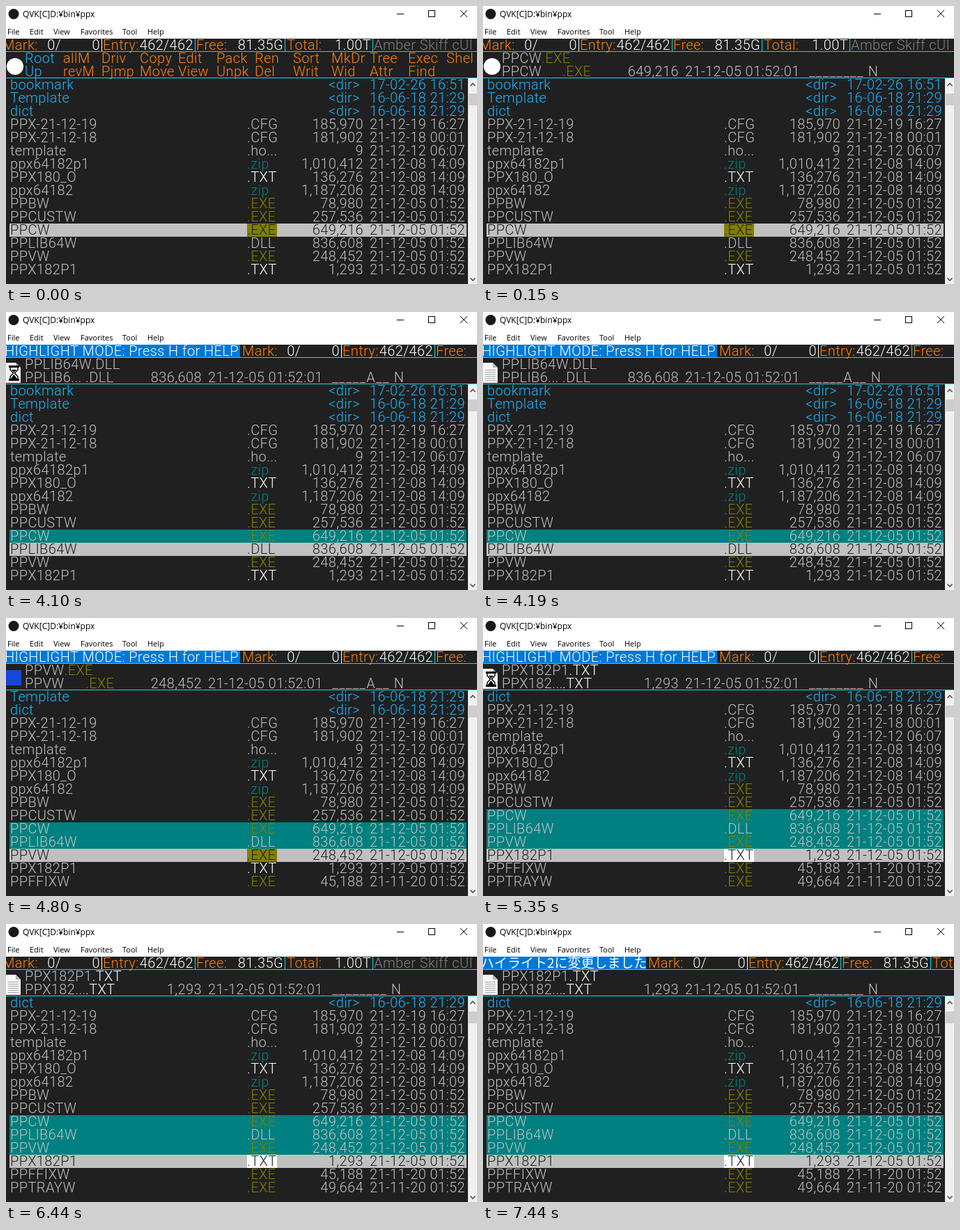
An HTML page with a canvas for the animation above (8 s loop, 676x400 px).

```html
<!DOCTYPE html>
<html lang="en">
<head>
<meta charset="utf-8">
<style>
html, body { margin: 0; width: 676px; height: 400px; overflow: hidden; background: #202020; }
canvas { display: block; }
</style>
</head>
<body>
<canvas id="stage" width="676" height="400"></canvas>
<script>
const ctx = document.getElementById('stage').getContext('2d');
const LOOP = 8000, ROW = 19, TOP = 104;
const BG = '#202020', GREY = '#c0c0c0', WHITE = '#ffffff', TEAL = '#008080', OLIVE = '#808000',
      ORANGE = '#ff8010', SKY = '#1eb4ff', BLUE = '#0078d7', CYAN = '#00e0f0', DIM = '#808080';
const LIST = "350 20px Roboto, 'Noto Sans', sans-serif";
const JP = "19px 'Noto Sans CJK JP', 'Noto Sans CJK', sans-serif";
const UI = "11px 'Open Sans', 'Noto Sans', sans-serif";
const TITLE = "12px 'Open Sans', 'Noto Sans', sans-serif";
const EXT = { '.EXE': OLIVE, '.zip': TEAL, '.TXT': WHITE };

// name, extension, size, date, time
const files = [
  ['bookmark', '', '<dir>', '17-02-26', '16:51'],
  ['Template', '', '<dir>', '16-06-18', '21:29'],
  ['dict', '', '<dir>', '16-06-18', '21:29'],
  ['PPX-21-12-19', '.CFG', '185,970', '21-12-19', '16:27'],
  ['PPX-21-12-18', '.CFG', '181,902', '21-12-18', '00:01'],
  ['template', '.ho...', '9', '21-12-12', '06:07'],
  ['ppx64182p1', '.zip', '1,010,412', '21-12-08', '14:09'],
  ['PPX180_O', '.TXT', '136,276', '21-12-08', '14:09'],
  ['ppx64182', '.zip', '1,187,206', '21-12-08', '14:09'],
  ['PPBW', '.EXE', '78,980', '21-12-05', '01:52'],
  ['PPCUSTW', '.EXE', '257,536', '21-12-05', '01:52'],
  ['PPCW', '.EXE', '649,216', '21-12-05', '01:52'],
  ['PPLIB64W', '.DLL', '836,608', '21-12-05', '01:52'],
  ['PPVW', '.EXE', '248,452', '21-12-05', '01:52'],
  ['PPX182P1', '.TXT', '1,293', '21-12-05', '01:52'],
  ['PPFFIXW', '.EXE', '45,188', '21-11-20', '01:52'],
  ['PPTRAYW', '.EXE', '49,664', '21-11-20', '01:52']
];

const commands = ['Root Up', 'allM revM', 'Driv Pjmp', 'Copy Move', 'Edit View', 'Pack Unpk',
  'Ren Del', 'Sort Writ', 'MkDr Wid', 'Tree Attr', 'Exec Find', 'Shel'];

const steps = [
  { at: 0, cursor: 11, scroll: 0, icon: 'app', menu: true },
  { at: 150, menu: false },
  { at: 1550, mode: 'help' },
  { at: 4100, cursor: 12, icon: 'wait' },
  { at: 4190, icon: 'page' },
  { at: 4800, cursor: 13, scroll: 1, icon: 'viewer' },
  { at: 5350, cursor: 14, scroll: 2, icon: 'wait' },
  { at: 5430, icon: 'page' },
  { at: 6440, mode: '' },
  { at: 7440, mode: 'done' }
];

function box(x, y, w, h, color) {
  ctx.fillStyle = color;
  ctx.fillRect(x, y, w, h);
}

function text(s, x, y, color, align = 'left', font = LIST, gap = 0.4) {
  ctx.font = font;
  ctx.letterSpacing = gap + 'px';
  ctx.textAlign = align;
  ctx.fillStyle = color;
  ctx.fillText(s, x, y);
}

function shape(points, color) {
  ctx.fillStyle = color;
  ctx.beginPath();
  points.forEach(([x, y]) => ctx.lineTo(x, y));
  ctx.fill();
}

function stroke(points, color, width = 1) {
  ctx.strokeStyle = color;
  ctx.lineWidth = width;
  ctx.beginPath();
  points.forEach(([x, y], i) => i ? ctx.lineTo(x, y) : ctx.moveTo(x, y));
  ctx.stroke();
}

function disc(x, y, r, color) {
  ctx.fillStyle = color;
  ctx.beginPath();
  ctx.arc(x, y, r, 0, 7);
  ctx.fill();
}

function drawWindow() {
  box(0, 0, 676, 47, WHITE);
  disc(11, 11.5, 7.5, '#181818');
  text('QVK[C]D:¥bin¥ppx', 24, 16, '#000', 'left', TITLE, 0);
  stroke([[561, 11.5], [571, 11.5]], '#000');
  ctx.strokeRect(606.5, 6.5, 9, 9);
  stroke([[652, 6], [662, 16]], '#000');
  stroke([[662, 6], [652, 16]], '#000');
  [['File', 2], ['Edit', 34], ['View', 68], ['Favorites', 107], ['Tool', 167], ['Help', 203]]
    .forEach(([s, x]) => text(s, x, 41, '#000', 'left', UI, 0));
}

function drawScrollbar() {
  box(663, TOP, 13, 296, '#f0f0f0');
  box(664, 126, 12, 17, '#cdcdcd');
  stroke([[666.5, 115], [670, 111.5], [673.5, 115]], '#505050', 1.6);
  stroke([[666.5, 391.5], [670, 395], [673.5, 391.5]], '#505050', 1.6);
}

function drawStatus(mode) {
  let dx = 0;
  const y = 63;
  if (mode === 'help') {
    dx = 344;
    box(0, 47, 336, 18, BLUE);
    text('HIGHLIGHT MODE: Press H for HELP', -2, y, WHITE);
  } else if (mode === 'done') {
    dx = 242;
    box(0, 47, 234, 18, BLUE);
    text('ハイライト2に変更しました', -3, y, WHITE, 'left', JP, 0);
  }
  [['Mark:', -5], ['Entry:', 139], ['Free:', 273], ['Total:', 403]]
    .forEach(([s, x]) => text(s, x + dx, y, ORANGE));
  [['0/', 79], ['0', 135], ['462/462', 269], ['81.35G', 398], ['1.00T', 524]]
    .forEach(([s, x]) => text(s, x + dx, y, WHITE, 'right'));
  [137, 271, 400, 526].forEach((x, i) => box(x + dx, 47, 1, 18, i ? CYAN : WHITE));
  text('Amber Skiff cUI', 528 + dx, y, DIM);
}

function drawPage() {
  shape([[0, 73], [14, 73], [21, 80], [21, 102], [0, 102]], '#f6f6f6');
  shape([[14, 73], [14, 80], [21, 80]], '#b8b8b8');
}

function drawIcon(kind) {
  if (kind === 'app') disc(13, 87, 12, WHITE);
  if (kind === 'viewer') box(0, 75, 22, 22, '#1846d8');
  if (kind === 'page') {
    drawPage();
    for (let y = 83; y < 100; y += 3) box(3, y, 15, 1, '#a8a8a8');
  }
  if (kind === 'wait') {
    drawPage();
    box(4, 77, 15, 3, '#000');
    box(4, 96, 15, 3, '#000');
    stroke([[6, 80], [6, 83], [10.5, 88], [6, 93], [6, 96]], '#000', 1.4);
    stroke([[17, 80], [17, 83], [12.5, 88], [17, 93], [17, 96]], '#000', 1.4);
    shape([[8, 83], [15, 83], [11.5, 87]], '#000');
    shape([[11.5, 90], [16, 96], [7, 96]], '#000');
  }
}

function drawCommands() {
  commands.forEach((pair, i) => {
    const [a, b = ''] = pair.split(' ');
    const color = i ? ORANGE : SKY, x = 27 + i * 55;
    text(a, x, 82, color);
    text(b, x, 101, color);
  });
}

function drawInfo(i) {
  const [name, ext, size, date, time] = files[i];
  const color = EXT[ext] || GREY;
  text(name, 27, 82, GREY);
  text(ext, 27 + ctx.measureText(name).width, 82, color);
  text(name.length > 6 ? name.slice(0, 6) + '...' : name, 27, 101, GREY);
  text(ext, 114, 101, color);
  text(size, 281, 101, GREY, 'right');
  text(`${date} ${time}:01`, 290, 101, GREY);
  const attr = i === 12 || i === 13 ? '_____A__ N' : '________ N';
  text(attr, 468, 101, GREY, 'left', LIST, 1.2);
}

function drawRow(i, row, cursor) {
  const [name, ext, size, date, time] = files[i];
  const y = TOP + row * ROW, base = y + 16;
  const isDir = size === '<dir>', here = i === cursor;
  const color = here ? BG : isDir ? SKY : GREY;
  const extColor = EXT[ext] || GREY;
  if (here) {
    box(5, y, 656, ROW, GREY);
    box(346, y, 43, ROW, extColor);
  } else if (i >= 11 && i < cursor) {
    box(5, y, 656, ROW, TEAL);
  }
  text(name, 6, base, color);
  text(ext, 346, base, here ? BG : extColor);
  text(size, isDir ? 508 : 513, base, color, 'right');
  text(`${date} ${time}`, 522, base, color);
}

function draw(t) {
  const s = Object.assign({}, ...steps.filter(step => step.at <= t));
  box(0, 0, 676, 400, BG);
  drawStatus(s.mode);
  box(0, 65, 676, 1, CYAN);
  drawIcon(s.icon);
  if (s.menu) drawCommands(); else drawInfo(s.cursor);
  box(0, 103, 676, 1, CYAN);
  for (let row = 0; row < 15; row++) drawRow(row + s.scroll, row, s.cursor);
  drawScrollbar();
  drawWindow();
}

const start = performance.now();
function tick() {
  draw((performance.now() - start) % LOOP);
  requestAnimationFrame(tick);
}
tick();
</script>
</body>
</html>
```
